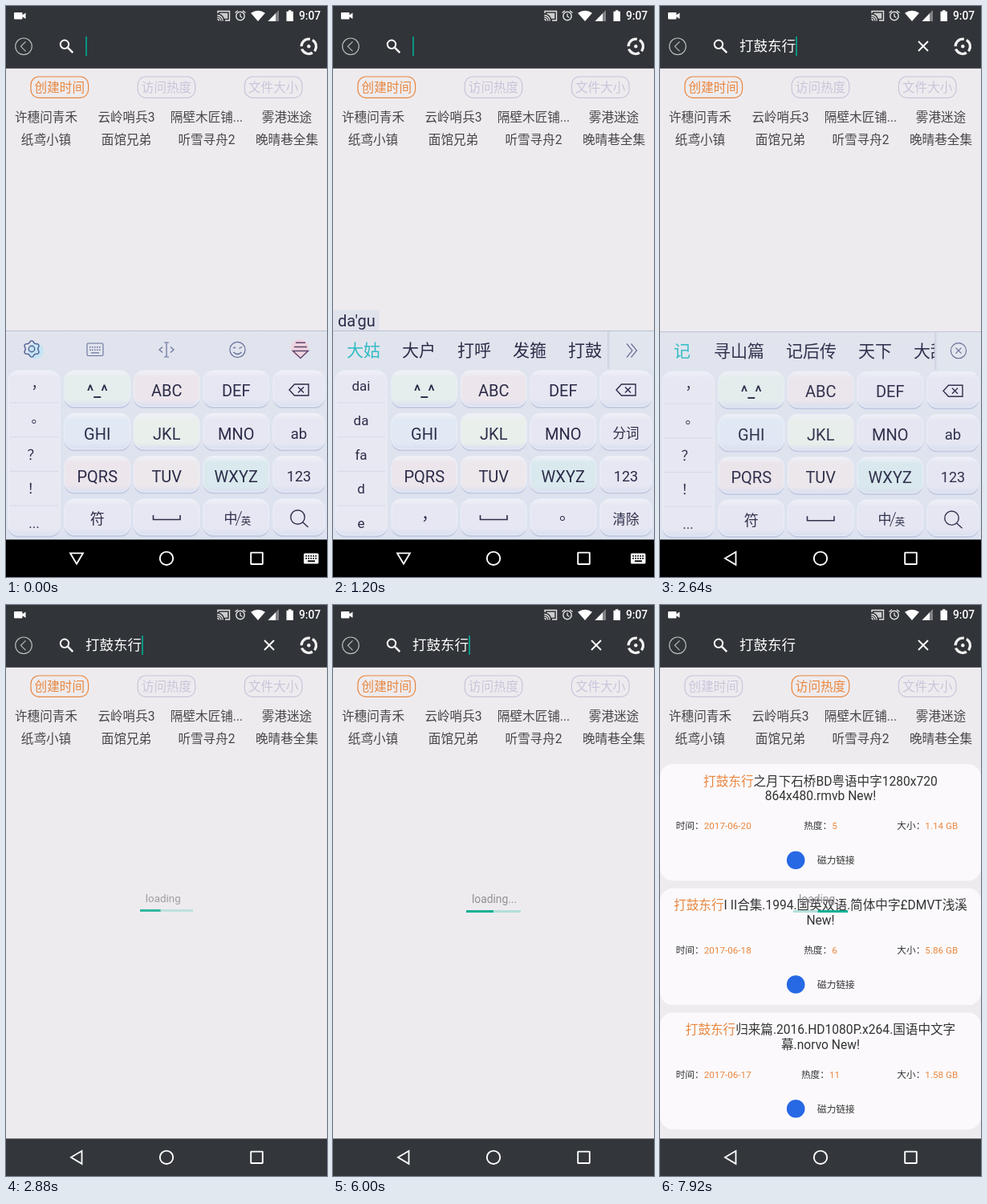
Recreate the animation shown at these times as an HTML page with a canvas. Size 400x711 px, loop 8 s.

```html
<!DOCTYPE html>
<html lang="zh-CN">
<head>
<meta charset="utf-8">
<title>Search</title>
<style>
html, body { margin: 0; width: 100%; height: 100%; overflow: hidden; background: #eeebef; }
canvas { display: block; width: 400px; height: 711px; }
</style>
</head>
<body>
<canvas id="stage"></canvas>
<script>
const LOOP = 8000, STEP = 120;
const COMMIT = 1800, CLOSE = 2600, CLOSED = 2880, RESULTS = 7200, RESORT = 7680;
const HEAD_END = 77.8, NAV_TOP = 664.4;
const FONT = 'Roboto, "Noto Sans CJK SC", "Noto Sans CJK", sans-serif';
const PAGE = '#eeebef', BAR = '#313438', NAV = '#33363b';
const ORANGE = '#e8873f', INK = '#2c2c49', LILAC = '#c9c5da';
const QUERY = '打鼓东行';

const canvas = document.getElementById('stage');
const dpr = window.devicePixelRatio || 1;
canvas.width = 400 * dpr;
canvas.height = 711 * dpr;
const c = canvas.getContext('2d');

// Text is placed by its vertical middle.
function text(s, x, y, size, color, align = 'center', weight = 400) {
  c.font = `${weight} ${size}px ${FONT}`;
  c.textAlign = align;
  c.fillStyle = color;
  c.fillText(s, x, y + size * 0.36);
}
function rich(parts, x, y, size) {
  c.font = `400 ${size}px ${FONT}`;
  const widths = parts.map(p => c.measureText(p[0]).width);
  x -= widths.reduce((a, b) => a + b, 0) / 2;
  parts.forEach(([s, color], i) => {
    text(s, x, y, size, color, 'left');
    x += widths[i];
  });
}
function rect(x, y, w, h, color) {
  c.fillStyle = color;
  c.fillRect(x, y, w, h);
}
function paint(fill, stroke, width = 1) {
  if (fill) { c.fillStyle = fill; c.fill(); }
  if (stroke) { c.strokeStyle = stroke; c.lineWidth = width; c.stroke(); }
}
function round(x, y, w, h, r, fill, stroke, width) {
  c.beginPath();
  c.roundRect(x, y, w, h, r);
  paint(fill, stroke, width);
}
function circle(x, y, r, fill, stroke, width) {
  c.beginPath();
  c.arc(x, y, r, 0, Math.PI * 2);
  paint(fill, stroke, width);
}
function arc(x, y, r, from, to, stroke, width) {
  c.beginPath();
  c.arc(x, y, r, from, to);
  paint(null, stroke, width);
}
function path(d, fill, stroke, width) {
  const p = new Path2D(d);
  if (fill) { c.fillStyle = fill; c.fill(p); }
  if (stroke) { c.strokeStyle = stroke; c.lineWidth = width || 1; c.stroke(p); }
}
function at(x, y, draw, angle = 0) {
  c.save();
  c.translate(x, y);
  c.rotate(angle);
  draw();
  c.restore();
}

function statusBar() {
  round(10, 8, 10.5, 8.5, 1, '#fff');
  path('M20 11.5L24.5 8.5V16L20 13Z', '#fff');
  path('M264 9V6.5H278.5V18H273', null, '#e4e4e4', 1.4);
  path('M266.5 8.7H276.2V15.8H272Q270.5 11.3 266.5 10Z', '#ccc');
  for (const r of [2, 4.5, 7]) arc(263.3, 18.5, r, -Math.PI / 2, 0, '#e4e4e4', 1.3);
  circle(292, 12.5, 5.2, null, '#e4e4e4', 1.4);
  path('M292 9.5V13L294.5 14.5M285.5 8.5L289 5.8M298.5 8.5L295 5.8', null, '#e4e4e4', 1.3);
  path('M305 8.8Q314 2.6 323 8.8L314 19Z', '#fff');
  path('M340 5V19H326.5Z', '#808285');
  path('M336 9.2V19H326.5Z', '#fff');
  path('M349.5 6.7H352V5.3H355.5V6.7H358V19H349.5Z', '#fff');
  text('9:07', 378.5, 12.2, 13.8, '#fff', 'center', 500);
}

function header(t) {
  rect(0, 0, 400, HEAD_END, BAR);
  statusBar();
  circle(22, 50.3, 10.3, null, '#b9bbbd', 1.2);
  path('M24.5 44.3L18.5 50.3L24.5 56.3', null, '#b9bbbd', 1.2);
  circle(73, 47.8, 5.2, null, '#fff', 2);
  path('M76.8 51.6L83.3 58.2', null, '#fff', 2.4);

  const typed = t >= COMMIT;
  if (typed) {
    text(QUERY, 99, 50, 17.5, '#fff', 'left');
    path('M322 44L334 56M334 44L322 56', null, '#fff', 1.9);
  }
  if (t < RESULTS) rect(typed ? 169 : 99, 38, 2, 24, '#0a9485');

  for (let i = 0; i < 3; i++) {
    const a = -1.05 + i * Math.PI * 2 / 3;
    arc(377.3, 50.3, 9.2, a, a + 1.75, '#f2f2f2', 3.2);
  }
  circle(377.3, 50.3, 2.2, '#f2f2f2');
}

function topics(t) {
  const active = t < RESORT ? 0 : 1;
  ['创建时间', '访问热度', '文件大小'].forEach((s, i) => {
    const x = 66.8 + i * 133.2, color = i === active ? ORANGE : LILAC;
    round(x - 35.8, 88, 71.6, 26.3, 10, null, color, 1.2);
    text(s, x, 101.5, 15.6, color);
  });
  const names = ['许穗问青禾', '云岭哨兵3', '隔壁木匠铺...', '雾港迷途',
    '纸鸢小镇', '面馆兄弟', '听雪寻舟2', '晚晴巷全集'];
  names.forEach((s, i) => text(s, 50 + i % 4 * 100, 138.7 + (i >> 2) * 27.3, 15.6, '#464548'));
}

const PUNCT = ['，', '。', '？', '！', '...'];
const STAGES = [
  { t: 0 },
  { t: 240, words: ['的', '到', '都', '等', '段'], side: ['d', 'e', 'f', '3'] },
  { t: 480, pinyin: 'da', words: ['大', '打', '发', '答', '达'], side: ['da', 'fa', 'd', 'e', 'f'] },
  { t: 960, pinyin: "da'g", words: ['大哥', '打个', '大概', '打鼓', '大国'], side: ['dai', 'da', 'fa', 'd', 'e'] },
  { t: 1200, pinyin: "da'gu", words: ['大姑', '大户', '打呼', '发箍', '打鼓'], side: ['dai', 'da', 'fa', 'd', 'e'] },
  { t: 1320, pinyin: "da'gu'd", words: ['打鼓的', '大鼓', '打鼓', '大户'], side: ['dai', 'da', 'fa', 'd', 'e'] },
  { t: 1440, pinyin: "da'gu'dong", words: ['打鼓动', '打鼓', '大姑', '大户'], side: ['dai', 'da', 'fa', 'd', 'e'] },
  { t: 1560, pinyin: "da'gu'dong'xing", words: [QUERY, '打鼓', '大姑', '大户'], side: ['dai', 'da', 'fa', 'd', 'e'] },
  { t: COMMIT, words: ['记', '寻山篇', '记后传', '天下', '大敌'], done: true }
];

function tools() {
  circle(37, 429.5, 10, '#c4e4f4');
  at(32, 427, () => {
    c.beginPath();
    for (let i = 0; i <= 64; i++) {
      const a = i / 64 * Math.PI * 2, r = 8.9 + 1.2 * Math.cos(a * 6);
      c.lineTo(r * Math.sin(a), r * Math.cos(a));
    }
    paint(null, '#515f94', 1.4);
    circle(0, 0, 3.7, null, '#515f94', 1.4);
  });
  round(101, 420, 20, 15.5, 1.5, null, '#66709c', 1.1);
  for (let i = 0; i < 10; i++) rect(104 + i % 5 * 3, 424 + (i / 5 | 0) * 3.5, 1.6, 1.5, '#66709c');
  rect(106, 431.3, 10, 1.2, '#66709c');
  path('M200 419V437M197 419H203M197 437H203M195 424.5L191 428L195 431.5M205 424.5L209 428L205 431.5',
    null, '#66709c', 1.2);
  circle(288.5, 428, 9.6, null, '#66709c', 1.2);
  path('M283.2 425.5H286M290.5 426.5L294 424.5M283.5 431Q288.5 436 293.5 431', null, '#66709c', 1.3);
  circle(366, 426, 11, '#efd3df');
  path('M361 419.2H373M359 424.5H375M357.5 429.5H376.5L367 438.5Z', null, '#5a4670', 1.4);
}

function candidates(stage) {
  let x = 17;
  c.save();
  c.beginPath();
  c.rect(0, 405, 344, 48);
  c.clip();
  stage.words.forEach((s, i) => {
    text(s, x, 428.5, 21, i ? INK : '#32bcc6', 'left');
    x += Math.max(s.length * 21 + 27, 50);
  });
  c.restore();
  const g = c.createLinearGradient(341, 0, 346, 0);
  g.addColorStop(0, '#c4cadc');
  g.addColorStop(1, '#e1e5ee');
  rect(342, 405, 58, 47, g);
  if (stage.done) {
    circle(372, 428, 9.6, null, '#646a90', 1.1);
    path('M368.5 424.5L375.5 431.5M375.5 424.5L368.5 431.5', null, '#646a90', 1.1);
  } else {
    path('M366 420.5L373 429L366 437.5M371.5 420.5L378.5 429L371.5 437.5', null, '#68709a', 1.2);
  }
}

function keycap(x, y, w, h, color) {
  round(x, y + 1, w, h + 1.5, 12, '#c3cbe2');
  const g = c.createLinearGradient(0, y, 0, y + h);
  g.addColorStop(0, '#f0f1f7');
  g.addColorStop(8 / h, color);
  g.addColorStop(1 - 8 / h, color);
  g.addColorStop(1, '#dadff0');
  round(x, y, w, h, 12, g, '#edf0f7', 1);
}

function keyboard(stage) {
  const typing = !!stage.side;
  if (stage.pinyin) {
    c.font = `400 20px ${FONT}`;
    rect(0, 378.5, c.measureText(stage.pinyin).width + 11, 25.5, '#e0e3ec');
    text(stage.pinyin, 6, 391.8, 20, INK, 'left');
  }
  const g = c.createLinearGradient(0, 404, 0, 664);
  g.addColorStop(0, '#e1e4ed');
  g.addColorStop(1, '#dce2ef');
  rect(0, 404, 400, 261, g);
  rect(0, 404, 400, 1, '#b9c0d4');
  if (stage.words) candidates(stage); else tools();

  keycap(3, 454, 64, 205, '#e7e8f2');
  for (let i = 0; i < 4; i++) rect(5, 493.5 + i * 42.7, 60, 1, '#d5d9e6');
  (stage.side || PUNCT).forEach((s, i) => {
    const wide = s === '，' || s === '。';
    text(s, wide ? 40 : 35, 473 + i * 42.7 - (wide ? 3 : 0), 17, INK);
  });

  const labels = ['^_^', 'ABC', 'DEF', '', 'GHI', 'JKL', 'MNO', typing ? '分词' : 'ab',
    'PQRS', 'TUV', 'WXYZ', '123', typing ? '' : '符', '', '', typing ? '清除' : ''];
  const tints = { 0: '#e4eeed', 1: '#ece6ec', 4: '#e0e9f4', 5: '#e9efeb', 8: '#ece5eb', 9: '#ede8ec', 10: '#d9e9ee' };
  const cols = [[73, 81.5], [159.5, 81.5], [246, 81.5], [333, 64]];
  labels.forEach((s, i) => {
    const [x, w] = cols[i % 4], y = 454 + (i >> 2) * 53.3;
    keycap(x, y, w, 44.5, tints[i] || '#e6e7f2');
    const size = i === 11 || i === 12 ? 18 : i % 4 < 3 ? 20 : typing ? 16.5 : 18.5;
    text(s, x + w / 2, y + 25, size, INK, 'center', i ? 400 : 500);
  });

  path('M353 478L359.5 471H377V485H359.5ZM364 474.5L371 481.5M371 474.5L364 481.5', null, INK, 1.4);
  path('M183.5 634V639.5H217V634', null, INK, 1.6);
  if (typing) {
    text('，', 120, 633, 20, INK);
    text('。', 292, 633, 20, INK);
  } else {
    text('中', 280, 637.5, 17, INK);
    path('M293.5 629L286.5 647', null, INK, 1);
    text('英', 299, 641, 12.5, INK);
    circle(363.5, 636.5, 8.7, null, INK, 1.4);
    path('M369.7 642.7L376.5 649', null, INK, 1.4);
  }
}

function navBar(t) {
  const y = 687.8;
  rect(0, NAV_TOP, 400, 711 - NAV_TOP, t < 2760 ? '#000' : NAV);
  const turn = Math.min(1, Math.max(0, (t - 1920) / 240));
  at(88, y, () => path('M-8 -6.5H8L0 7Z', null, '#fff', 1.8), turn * Math.PI / 2);
  circle(200, y, 8.2, null, '#fff', 1.9);
  round(305.2, y - 7.2, 14.6, 14.4, 0.5, null, '#fff', 1.9);
  if (turn === 1) return;
  c.globalAlpha = 1 - turn;
  round(371, 681.5, 18.5, 13, 1.5, '#fff');
  for (let i = 0; i < 10; i++) rect(373.3 + i % 5 * 3, 684 + (i / 5 | 0) * 3, 1.7, 1.7, '#000');
  rect(376, 690.3, 9, 1.8, '#000');
  c.globalAlpha = 1;
}

const FILES = [
  { title: '之月下石桥BD粤语中字1280x720', more: '864x480.rmvb New!', date: '2017-06-20', heat: '5', size: '1.14 GB' },
  { title: 'I II合集.1994.国英双语.简体中字£DMVT浅溪', more: 'New!', date: '2017-06-18', heat: '6', size: '5.86 GB' },
  { title: '归来篇.2016.HD1080P.x264.国语中文字', more: '幕.norvo New!', date: '2017-06-17', heat: '11', size: '1.58 GB' }
];

function results() {
  FILES.forEach((f, i) => {
    const y = 198 + i * 154.8;
    round(0, y, 400, 145.3, 16, '#fbf9fc');
    rich([[QUERY, ORANGE], [f.title, '#333']], 200, y + 21, 15.6);
    text(f.more, 200, y + 39.7, 15.6, '#333');
    [['时间：', f.date], ['热度：', f.heat], ['大小：', f.size]].forEach(([label, value], k) =>
      rich([[label, '#333'], [value, ORANGE]], 66.7 + k * 133.3, y + 77.2, 11.7));
    circle(169.2, y + 119.7, 11.3, '#2768e4');
    text('磁力链接', 196, y + 120, 11.7, '#333', 'left');
  });
}

// The bar fills dark, then light, each sweep eased.
function loader(t) {
  const since = t - (t < RESULTS ? 2760 : RESORT);
  const show = Math.min(1, 0.35 + since / 240);
  const zoom = 0.8 + 0.2 * show;
  const dots = Math.floor((t - 2740) % 840 / 210);
  const p = (0.425 + (t - 2880) * 0.002588) % 2;
  const u = p % 1, w = 68 * u * u * (3 - 2 * u);
  c.save();
  c.globalAlpha = show;
  c.translate(200, 345);
  c.scale(zoom, zoom);
  text('loading' + '.'.repeat(dots), -27, 20.7, 13.8, '#929094', 'left');
  const dark = '#13b093', light = '#b3dfd9';
  rect(-34, 35, 68, 3, p < 1 ? light : dark);
  rect(-34, 35, w, 3, p < 1 ? dark : light);
  c.restore();
}

function draw(t) {
  c.setTransform(dpr, 0, 0, dpr, 0, 0);
  rect(0, 0, 400, 711, PAGE);
  header(t);
  topics(t);
  if (t >= RESULTS) results();
  if (t < CLOSED) {
    const u = Math.max(0, (t - CLOSE) / 240);
    c.save();
    c.globalAlpha = Math.max(0, 1 - u * u);
    c.translate(0, 260 * u ** 3);
    keyboard(STAGES.filter(s => s.t <= t).pop());
    c.restore();
  }
  if (t >= 2760 && (t < RESULTS || t >= RESORT)) loader(t);
  navBar(t);
}

const start = performance.now();
function tick(now) {
  const t = Math.max(0, now - start) % LOOP;
  draw(Math.floor(t / STEP) * STEP);
  requestAnimationFrame(tick);
}
draw(0);
requestAnimationFrame(tick);
</script>
</body>
</html>
```
